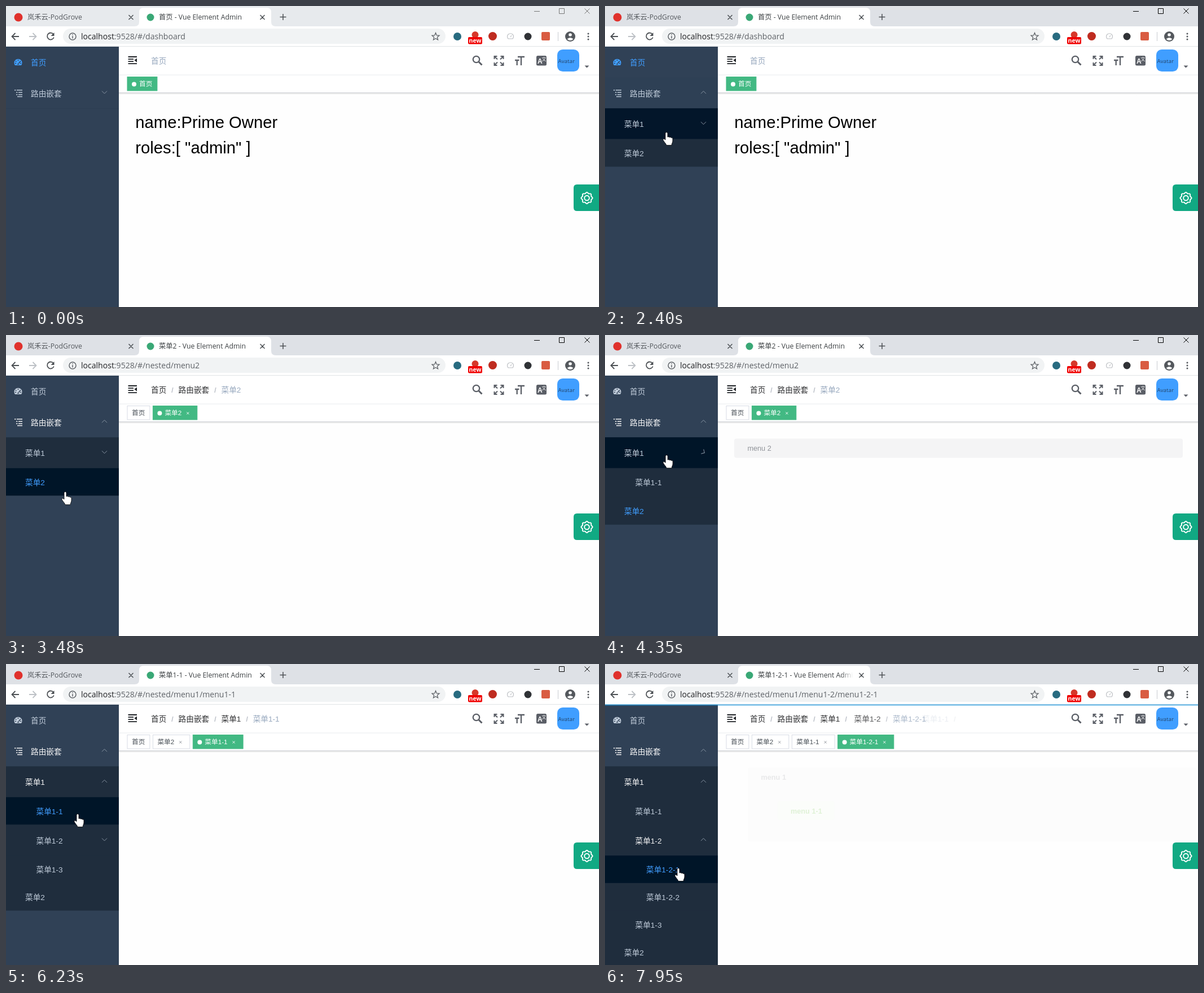
Recreate the animation shown at these times as an HTML page. Size 1051x533 px, loop 8000 ms.

```html
<!DOCTYPE html>
<html lang="zh">
<head>
<meta charset="utf-8">
<style>
  html, body { margin: 0; height: 100%; overflow: hidden; background: #fefefe; }
  svg { display: block; width: 1051px; height: 533px; font-family: "Liberation Sans", "Noto Sans CJK SC", sans-serif; }
  .ui { font-family: "Open Sans", "Noto Sans CJK SC", sans-serif; }
  text { white-space: pre; }
</style>
</head>
<body>
<svg viewBox="0 0 1051 533">
  <defs>
    <clipPath id="tabClip"><path d="M236 0h204v36H236z"/></clipPath>
    <linearGradient id="fade"><stop stop-color="#fff" stop-opacity="0"/><stop offset="1" stop-color="#fff"/></linearGradient>
    <linearGradient id="shade" x2="0" y2="1"><stop stop-color="#000" stop-opacity=".13"/><stop offset="1" stop-color="#000" stop-opacity="0"/></linearGradient>
  </defs>

  <!-- browser -->
  <path id="strip" d="M0 0h1051v36H0z"/>
  <path fill="#fff" d="M228 36q8 0 8-8V11q0-8 8-8h218q8 0 8 8v17q0 8 8 8h573v35H0V36z"/>
  <path fill="#e1e3e6" d="M0 71h1051v1H0z"/>
  <circle cx="22" cy="20" r="7.5" fill="#e0312c"/>
  <circle cx="256" cy="20" r="6.5" fill="#3aa876"/>
  <text class="ui" x="38" y="24" font-size="12.25" fill="#55595e">岚禾云-PodGrove</text>
  <g fill="none" stroke="#4c5054" stroke-width="1.5">
    <path d="M217.5 16l8 8m0-8l-8 8M450.5 16l8 8m0-8l-8 8M485.5 19.5h11m-5.5-5.5v11"/>
    <path stroke-width="1.8" d="M23 54H10.5m6-6l-6 6 6 6M84 50a6 6 0 1 0 .8 5.5"/>
    <path stroke="#bdc1c6" stroke-width="1.8" d="M41 54h12.5m-6-6l6 6-6 6"/>
  </g>
  <path fill="#4c5054" d="M85.5 47v6h-6z"/>
  <g id="controls" fill="none">
    <path d="M936 9.5h10M980.5 4.5h9v9h-9zM1025.5 4.5l9 9m0-9l-9 9"/>
  </g>
  <rect x="101" y="40" width="678" height="27" rx="13.5" fill="#f1f3f4"/>
  <g fill="none" stroke="#5f6368" stroke-width="1.5">
    <circle cx="118" cy="54" r="6"/><path d="M118 53v4.5M118 50v1.6"/>
    <path stroke-width="1.3" d="M761.5 47.5l1.8 4.4 4.7.4-3.6 3 1.1 4.6-4-2.5-4 2.5 1.1-4.6-3.6-3 4.7-.4z"/>
    <path stroke="#bcbfc3" stroke-width="1.2" d="M890 58a5.5 5.5 0 1 1 8 0zM894 55l2-3"/>
  </g>
  <circle cx="800" cy="54" r="7" fill="#286b80"/>
  <circle cx="831.5" cy="51" r="6" fill="#d6382b"/>
  <rect x="819" y="55" width="25" height="12.5" rx="2" fill="#f00000"/>
  <text class="ui" x="831.5" y="65" font-size="10.5" font-weight="700" text-anchor="middle" fill="#fff">new</text>
  <circle cx="862.5" cy="53.5" r="7.5" fill="#bf2c20"/>
  <circle cx="925" cy="54" r="6.5" fill="#303236"/>
  <rect x="949" y="46" width="15" height="15" rx="2" fill="#d95c42"/>
  <path fill="#c9cdd2" d="M978 46h1v16h-1z"/>
  <circle cx="1000" cy="54" r="9" fill="#54585d"/>
  <circle cx="1000" cy="51" r="2.8" fill="#fff"/><path fill="#fff" d="M994.5 58.5q5.5-5 11 0-5.5 5-11 0"/>
  <path stroke="#54585d" stroke-width="3" stroke-linecap="round" d="M1032 49h0m0 5h0m0 5h0"/>

  <!-- page header -->
  <path fill="#fff" d="M200 72h851v81H200z"/>
  <path fill="#eef0f2" d="M200 121.5h851v1.2H200z"/>
  <path fill="#d3d6db" d="M200 153h851v1H200z"/>
  <path fill="url(#shade)" d="M200 154h851v3H200z"/>
  <path fill="none" stroke="#1d2024" stroke-width="1.8" d="M216.5 90H232M216.5 94.2h9.5M216.5 98.2h9.5M216.5 102.2H232"/>
  <path fill="#1d2024" d="M232 92.5v7.2l-4.5-3.6z"/>
  <g fill="none" stroke="#5a5e66" stroke-width="2.3">
    <circle cx="833.5" cy="94.5" r="5.7"/><path stroke-width="3" d="M838 99l5.5 5.5"/>
    <path stroke-width="2" d="M865.5 94v-5h5m6 0h5v5m0 6v5h-5m-6 0h-5v-5M866 89.5l5 5m10-5l-5 5m5 10l-5-5m-10 5l5-5"/>
    <path d="M907 90h12M913 90v15M902 96h7.5M905.7 96v9"/>
  </g>
  <rect x="940" y="88" width="18" height="17.5" rx="2.5" fill="#5a5e66"/>
  <text x="942" y="102" font-size="12" font-weight="700" fill="#fff">A</text>
  <text x="949.5" y="97" font-size="8" fill="#fff">文</text>
  <rect x="977" y="77" width="39" height="39" rx="9.75" fill="#409eff"/>
  <text class="ui" x="978.5" y="101" font-size="9.8" fill="#24466c">Avatar</text>
  <path fill="#5a5e66" d="M1025.500 105.500h8l-4 4z"/>

  <g id="live"></g>
</svg>
<script>
const $ = id => document.getElementById(id);
const clamp = v => Math.max(0, Math.min(1, v));

// Cubic Bezier timing curve
const bezier = (x1, y1, x2, y2) => x => {
  if (x <= 0 || x >= 1) return clamp(x);
  const at = (a, b, s) => 3 * a * s * (1 - s) ** 2 + 3 * b * s * s * (1 - s) + s ** 3;
  let lo = 0, hi = 1;
  for (let i = 0; i < 20; i++) {
    const mid = (lo + hi) / 2;
    at(x1, x2, mid) < x ? lo = mid : hi = mid;
  }
  return at(y1, y2, lo);
};
const ease = bezier(.25, .1, .25, 1), inOut = bezier(.42, 0, .58, 1);

const rect = (x, y, w, h, fill, more = '') => `<rect x="${x}" y="${y}" width="${w}" height="${h}" fill="${fill}" ${more}/>`;
const text = (x, y, size, fill, s, more = '') => `<text x="${x}" y="${y}" font-size="${size}" fill="${fill}" ${more}>${s}</text>`;
const group = (x, y, opacity, s) => `<g transform="translate(${x} ${y})" opacity="${opacity}">${s}</g>`;
const width = (s, size) => size * [...s].reduce((w, c) => w + (c > '~' ? 1 : c === '-' ? .333 : .556), 0);

const routes = [
  { at: 0, url: 'dashboard', path: ['首页'] },
  { at: 2980, url: 'nested/menu2', path: ['首页', '路由嵌套', '菜单2'] },
  { at: 5750, url: 'nested/menu1/menu1-1', path: ['首页', '路由嵌套', '菜单1', '菜单1-1'] },
  { at: 7700, url: 'nested/menu1/menu1-2/menu1-2-1', path: ['首页', '路由嵌套', '菜单1', '菜单1-2', '菜单1-2-1'] },
];
const last = r => r.path[r.path.length - 1];

const tree = [
  { name: '首页' },
  { name: '路由嵌套', at: 1640, kids: [
    { name: '菜单1', at: 4230, kids: [
      { name: '菜单1-1' },
      { name: '菜单1-2', at: 6950, kids: [{ name: '菜单1-2-1' }, { name: '菜单1-2-2' }] },
      { name: '菜单1-3' }] },
    { name: '菜单2' }] },
];

// Menu row under the pointer, from each time on
const hovers = [[780, '首页'], [1330, '路由嵌套'], [2130, '菜单1'], [2860, '菜单2'], [3800, '菜单1'], [4620, '菜单1-1'],
  [4880, '菜单1-2'], [5480, '菜单1-1'], [6720, '菜单1-2'], [7280, '菜单1-2-1'], [9000, '']];

// Pointer stops: time, x, y
const stops = [[70, 903, 515], [500, 420, 250], [850, 168, 96], [1310, 95, 135], [1480, 92, 163], [1800, 94, 163],
  [2400, 109, 224], [2490, 107, 234], [2720, 105, 278], [3700, 105, 278], [4150, 108, 212], [4500, 110, 214],
  [5120, 131, 292], [5430, 131, 290], [5670, 127, 266], [6650, 127, 266], [6900, 123, 306], [7120, 122, 310],
  [7380, 121, 353], [7530, 128, 352], [7640, 128, 352], [7720, 130, 362], [8000, 130, 362]];

const alert = (x, y, w, h, bg, fg, title, bold) => rect(x, y, w, h, bg, 'rx="4"') +
  text(x + 23.4, y + 21.5, 12.7, fg, title, bold ? 'font-weight="700"' : '');
const pages = [
  text(229.25, 216, 29.25, '#000', 'name:Prime Owner') + text(229.25, 261, 29.25, '#000', 'roles:[ "admin" ]'),
  alert(229, 183.5, 795, 34, '#f4f4f5', '#909399', 'menu 2'),
  alert(229, 183.5, 795, 131, '#f4f4f5', '#909399', 'menu 1', true) +
    alert(281.5, 243, 101, 33, '#f0f9eb', '#67c23a', 'menu 1-1', true),
  '',
];

const homeIcon = fill => `<path fill="${fill}" d="M16 105a7 7 0 1 1 11 0z"/>
  <path stroke="#304156" stroke-width="1.5" d="M21.5 95v2M17 97.5l1.3 1.2M26 97.5l-3.5 4M16 101.5h2M25 101.5h2M20 103h3"/>`;
const treeIcon = stroke => `<path fill="none" stroke="${stroke}" stroke-width="1.7"
  d="M15 149h2.5M19 149h10M18 153h2.5M22 153h7M18 157h2.5M22 157h7M20 160.5h9"/>`;

function hoverLevel(name, t) {
  return Math.max(...hovers.slice(0, -1).map(([on, n], i) =>
    n === name ? clamp((t - on) / 300) - clamp((t - hovers[i + 1][0]) / 300) : 0));
}

function drawMenu(t, route) {
  let out = '';
  // Later rows cover the folded part of earlier ones
  const list = (nodes, y, depth) => {
    for (const { name, at, kids } of nodes) {
      const h = kids || !depth ? 54.6 : 48.75, mid = y + h / 2;
      const open = kids ? inOut((t - at) / 300) : 0;
      const color = last(route) === name ? '#409eff' : kids && route.path.includes(name) ? '#f4f4f5' : '#bfcbd9';
      out += rect(0, y, 200, h + 1.5, depth ? '#1f2d3d' : '#304156') +
        rect(0, y, 200, h, depth ? '#001528' : '#263445', `opacity="${hoverLevel(name, t)}"`) +
        text(depth ? 14.5 + 19.5 * depth : 44, mid + 5.9, 13.65, color, name);
      if (!depth) out += kids ? treeIcon(color) : homeIcon(color);
      if (kids) out += `<path transform="translate(174.5 ${mid - 1}) rotate(${-180 * open})" fill="none" stroke="#8794a3" d="M-4.5-2.3L0 2.2 4.5-2.3"/>`;
      y += h;
      if (kids) y += (list(kids, y, depth + 1) - y) * open;
    }
    return y;
  };
  const end = list(tree, 72, 0);
  return out + rect(0, end, 200, Math.max(0, 533 - end), '#304156');
}

function drawCrumbs(i, age) {
  const { path } = routes[i], old = i ? routes[i - 1].path : path, p = ease(age / 500);
  let x = 257, out = '';
  const crumb = (s, color, sep) => text(0, 0, 13.65, color, s) +
    (sep ? text(width(s, 13.65) + 8.8, 0, 13.65, '#c0c4cc', '/', 'font-weight="700"') : '');
  path.forEach((s, k) => {
    const end = k === path.length - 1, fresh = !old.includes(s);
    out += group(x + (fresh ? 20 * (1 - p) : 0), 102, fresh ? p : 1, crumb(s, end ? '#97a8be' : '#303133', !end));
    if (!end) x += width(s, 13.65) + 21.3;
  });
  const gone = old[old.length - 1];
  if (p < 1 && !path.includes(gone)) out += group(x + 40 + 20 * p, 102, 1 - p, crumb(gone, '#97a8be', true));
  return out;
}

function drawTags(i) {
  let x = 215, out = '';
  routes.slice(0, i + 1).forEach((r, k) => {
    const s = last(r), on = k === i, color = on ? '#fff' : '#495057';
    const w = width(s, 11.7) + (k ? 35.5 : 16.5) + (on ? 13 : 0);
    out += rect(x, 125.5, w, 24.5, on ? '#42b983' : '#fff', `stroke="${on ? '#42b983' : '#d8dce5'}"`) +
      text(x + (on ? 21 : 8), 142.3, 11.7, color, s);
    if (on) out += `<circle cx="${x + 12}" cy="138.5" r="4" fill="#fff"/>`;
    if (k) out += `<path stroke="${on ? '#fff' : '#8a8f96'}" d="M${x + w - 18.5} 136.5l4 4m0-4l-4 4"/>`;
    x += w + 5.5;
  });
  return out;
}

function drawPage(i, age) {
  const p = ease(age / 500), q = ease((age - 500) / 500);
  if (!i) return pages[0];
  return age < 500 ? group(30 * p, 0, 1 - p, pages[i - 1]) : group(-30 * (1 - q), 0, q, pages[i]);
}

function drawPointer(t) {
  const k = stops.findIndex(s => s[0] > t);
  if (k < 1) return '';
  const [a, b] = [stops[k - 1], stops[k]], p = (t - a[0]) / (b[0] - a[0]);
  const x = a[1] + (b[1] - a[1]) * p, y = a[2] + (b[2] - a[2]) * p;
  const shape = x < 200
    ? 'M-2 1.5a2 2 0 0 1 4 0V8c1-.8 3-.6 3.4.6 1-.7 2.8-.4 3.2.8 1-.5 2.4 0 2.4 1.6v4c0 3-2 4.5-2 7.5H0C-1 19-6 15-6 12.5c0-1.6 2-2 4 .5z'
    : 'M0 0v16l3.8-3.5 2.6 6 2.4-1-2.6-6H11.5z';
  return group(x, y, 1, `<path fill="#fff" stroke="#000" stroke-width=".8" d="${shape}"/>`);
}

// Eight-lobed outline around a ring
const lobes = Array.from({ length: 96 }, (_, i) => {
  const a = i * Math.PI / 48, r = 9.2 + .9 * Math.cos(8 * a);
  return (r * Math.cos(a)).toFixed(2) + ' ' + (r * Math.sin(a)).toFixed(2);
});
const settings = '<path fill="#11a983" d="M1051 316h-39q-6 0-6 6v35q0 6 6 6h39z"/>' +
  group(1029.5, 340, 1, `<g fill="none" stroke="#fff" stroke-width="1.9"><path d="M${lobes.join('L')}z"/><circle r="4.3"/></g>`);

function draw(t) {
  const active = t >= 1630;
  $('strip').setAttribute('fill', active ? '#dee1e6' : '#e7eaed');
  $('controls').setAttribute('stroke', active ? '#000' : '#777');

  const i = routes.filter(r => r.at <= t).length - 1, route = routes[i], age = t - route.at, name = last(route);
  const title = `<g class="ui" clip-path="url(#tabClip)">${text(271, 24, 12.25, '#3c4043', name + ' - Vue Element Admin')}</g>` +
    (name.length > 6 ? rect(418, 10, 22, 20, 'url(#fade)') : '');
  const url = text(133, 58.5, 14.05, '#5f6368', `<tspan fill="#202124">localhost</tspan>:9528/#/${route.url}`, 'class="ui"');
  const bar = i ? rect(0, 71.5, 1051 * clamp(age / 200), 2, '#29d', `opacity="${1 - clamp((age - 200) / 200)}"`) : '';

  $('live').innerHTML = title + url + drawPage(i, age) + drawCrumbs(i, age) + drawTags(i) +
    drawMenu(t, route) + settings + bar + drawPointer(t);
}

function tick() {
  draw(performance.now() % 8000);
  requestAnimationFrame(tick);
}
tick();
</script>
</body>
</html>
```
